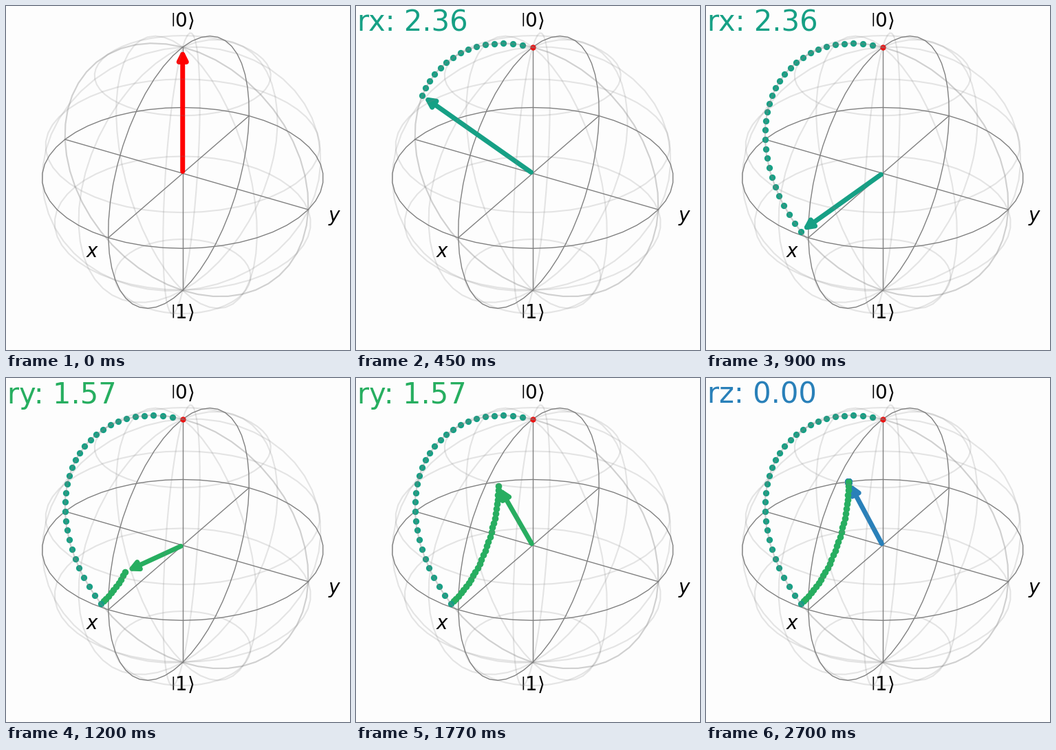
Animation of 500 by 500 pixels, one loop 2730 ms. Source, as a matplotlib script:

```python
import numpy as np
import matplotlib.pyplot as plt
from matplotlib.animation import FuncAnimation
from matplotlib.collections import LineCollection
from matplotlib.patches import FancyArrowPatch

STEPS = 30  # frames per gate
GATES = [
    ("rx", 3 * np.pi / 4, "#16a085", 32),
    ("ry", np.pi / 2, "#27ae60", 35),
    ("rz", 0.0, "#2980b9", 45),
]
AZIM, ELEV, DIST = np.radians(-60), np.radians(30), 10
SCALE = 1.8294640721620434 / np.sqrt(3) / 1.4

RIGHT = np.array([-np.sin(AZIM), np.cos(AZIM), 0])
TOWARD = np.array([np.cos(ELEV) * np.cos(AZIM), np.cos(ELEV) * np.sin(AZIM), np.sin(ELEV)])
UP = np.cross(TOWARD, RIGHT)


def project(points):
    """Perspective view of (..., 3) points."""
    p = np.asarray(points, float) * SCALE
    depth = DIST - p @ TOWARD
    return np.stack([p @ RIGHT / depth, p @ UP / depth], axis=-1)


def bloch(points):
    """View of Bloch vectors, whose x axis points along -y of the scene."""
    x, y, z = np.moveaxis(np.asarray(points, float), -1, 0)
    return project(np.stack([y, -x, z], axis=-1))


def rotate(v, axis, angle):
    c, s = np.cos(angle), np.sin(angle)
    x, y, z = v
    if axis == "rx":
        return np.array([x, c * y - s * z, s * y + c * z])
    if axis == "ry":
        return np.array([c * x + s * z, y, c * z - s * x])
    return np.array([c * x - s * y, s * x + c * y, z])


def half_sphere(start):
    """Wireframe and great circles over half a turn."""
    u = np.linspace(start, start + np.pi, 25)
    v = np.linspace(0, np.pi, 25)
    grid = np.stack([
        np.outer(np.cos(u), np.sin(v)),
        np.outer(np.sin(u), np.sin(v)),
        np.outer(np.ones(25), np.cos(v)),
    ], axis=-1)
    flat = project(grid)
    picks = [0, 5, 10, 15, 20, 24]
    lines = [flat[i] for i in picks] + [flat[:, i] for i in picks]
    ax.add_collection(LineCollection(lines, colors="gray", alpha=0.2,
                                     linewidths=1.5, zorder=8))
    zero = np.zeros(25)
    draw_line(np.stack([np.cos(u), np.sin(u), zero], axis=-1))
    draw_line(np.stack([zero, np.cos(u), np.sin(u)], axis=-1))


def draw_line(points):
    ax.plot(*project(points).T, lw=1, color="gray", zorder=2)


def dots(color, size, zorder):
    return ax.scatter([], [], s=size, color=color, marker="o", zorder=zorder)


fig = plt.figure(figsize=(5, 5), dpi=100, facecolor="#fdfdfd")
ax = fig.add_axes([0, 0, 1, 1])
ax.axis("off")

for unit in np.eye(3):
    draw_line([-unit, unit])
half_sphere(0)
half_sphere(-np.pi)

for pos, label in [
    ((1.2, 0, 0), "$x$"),
    ((0, 1.2, 0), "$y$"),
    ((0, 0, 1.2), r"$\left|0\right>$"),
    ((0, 0, -1.2), r"$\left|1\right>$"),
]:
    ax.text(*bloch(pos), label, fontsize=20, color="black",
            ha="center", va="center", zorder=2.6)

caption = ax.text(*bloch((1.40, -0.45, 1.65)), "", fontsize=30,
                  ha="left", va="center", zorder=2.6)

# State vectors along each gate
north = np.array([0.0, 0.0, 1.0])
paths, state = [], north
for axis, angle, _, _ in GATES:
    paths.append(np.array([rotate(state, axis, angle * (i + 1) / STEPS)
                           for i in range(STEPS)]))
    state = paths[-1][-1]

start_dot = dots("r", 25, 6)
trails = [dots(color, size, 5 - k) for k, (_, _, color, size) in enumerate(GATES)]

arrow = FancyArrowPatch((0, 0), (0, 0.05), arrowstyle="-|>", mutation_scale=20, lw=5)
ax.add_patch(arrow)
ax.set_xlim(-0.095, 0.09)
ax.set_ylim(-0.095, 0.09)

EMPTY = np.empty((0, 2))


def update(frame):
    gate, step = divmod(frame - 1, STEPS)
    if frame == 0:
        tip, color = north, "r"
        caption.set_text("")
        start_dot.set_offsets(EMPTY)
    else:
        name, angle, color, _ = GATES[gate]
        tip = paths[gate][step]
        caption.set_text(f"{name}: {angle:.2f}")
        caption.set_color(color)
        start_dot.set_offsets(bloch([north]))

    for k, trail in enumerate(trails):
        count = int(np.clip(frame - k * STEPS, 0, STEPS))
        trail.set_offsets(bloch(paths[k][:count]) if count else EMPTY)

    arrow.set_positions((0, 0), tuple(bloch(tip)))
    arrow.set_color(color)
    arrow.set_zorder(5.5 - gate if frame else 2.5)
    return [arrow, caption, start_dot, *trails]


anim = FuncAnimation(fig, update, frames=len(GATES) * STEPS + 1, interval=30,
                     repeat=True, repeat_delay=0, blit=False)
plt.show()
```
